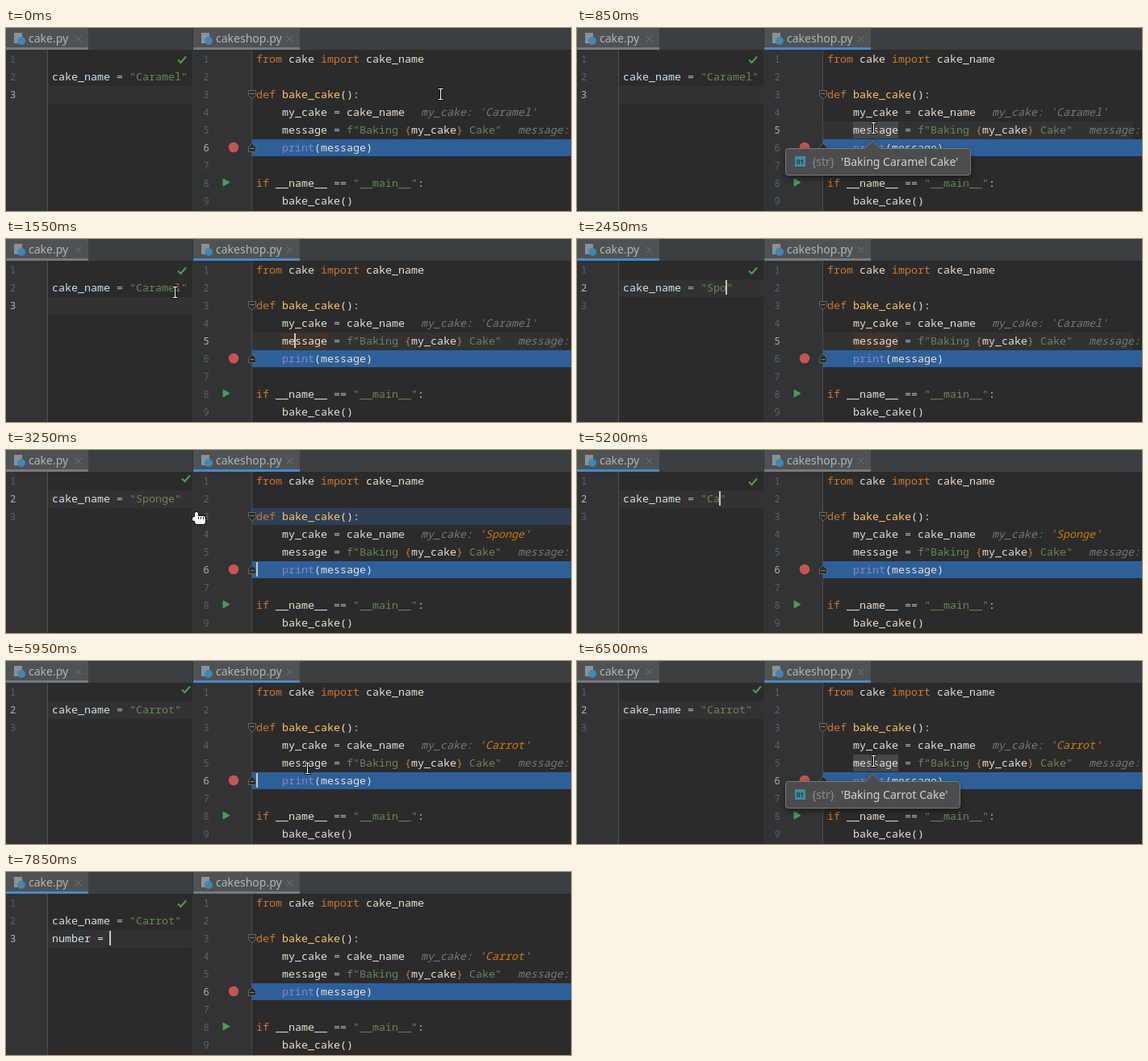
Write an HTML page with a canvas that moves like this. It is 700 px wide and 227 px high and loops after 8 s.

```html
<!DOCTYPE html>
<html lang="en">
<head>
<meta charset="utf-8">
<title>Cake shop debugging</title>
<style>
html, body { margin: 0; width: 700px; height: 227px; overflow: hidden; background: #2b2b2b; }
canvas { display: block; }
</style>
</head>
<body>
<canvas id="stage" width="700" height="227"></canvas>
<script>
const ctx = document.getElementById("stage").getContext("2d");
const LOOP = 8000, STEP = 50, CH = 8;
const MONO = '13.333px "Noto Sans Mono", "DejaVu Sans Mono", monospace';
const NUMS = '12px "Noto Sans Mono", "DejaVu Sans Mono", monospace';
const SANS = '14px "Noto Sans", "Open Sans", sans-serif';
const C = {
  name: "#eee0d2", left: "#cfe3f3", punct: "#b4bec8", key: "#cc7832", fn: "#ffc66d", str: "#6a8759",
  call: "#8888c6", hint: "#787878", changed: "#ca7e03", num: "#5c6268", numOn: "#b4b4b4",
  edit: "#2b2b2b", gutter: "#313335", row: "#323232", exec: "#2d6099", hover: "#2e3f54",
  bar: "#3c3f41", tab: "#4e5254", focus: "#4a88c7", blur: "#747a80", green: "#499c54"
};

// Right-hand code: row, x, then [text, colour] parts
const CODE = [
  [1, 310, ["from ", C.key], ["cake ", C.name], ["import ", C.key], ["cake_name", C.name]],
  [3, 310, ["def ", C.key], ["bake_cake", C.fn], ["():", C.name]],
  [4, 342, ["my_cake", C.name], [" = ", C.punct], ["cake_name", C.name]],
  [5, 342, ["message", C.name], [" = ", C.punct], ['f"Baking ', C.str], ["{", C.key], ["my_cake", C.name], ["}", C.key], [' Cake"', C.str]],
  [6, 342, ["print", C.call], ["(message)", C.name]],
  [8, 310, ["if ", C.key], ["__name__", C.name], [" == ", C.punct], ['"__main__"', C.str], [":", C.name]],
  [9, 342, ["bake_cake()", C.name]]
];

// Pointer moves: start, duration, destination; no destination hides it
const MESSAGE = [367, 124], WORD = [180, 55];
const MOVES = [
  [0, 0, [538, 82]], [0, 600, MESSAGE], [1400, 200, WORD], [2000],
  [3200, 0, [232, 82]], [3200, 450, MESSAGE], [4050, 100, [120, 54]], [4200, 200, WORD], [4500, 200, [105, 153]], [5000],
  [5750, 0, [425, 211]], [5750, 250, MESSAGE], [6500, 450, [92, 114]], [7250]
];

const rowTop = row => 28 + 22 * (row - 1);
const ease = k => k * k * (3 - 2 * k);
const type = (s, t, start, pace) => t < start ? "" : s.slice(0, 1 + Math.floor((t - start) / pace));

// Everything on stage that changes, as a function of time
function stateAt(t) {
  const during = (a, b) => t >= a && t < b;
  const retyped = t >= 5000 ? type("Carrot", t, 5050, 90)
    : type("S", t, 2000, 50) + type("po", t, 2350, 100) + type("nge", t, 2700, 50);
  const leftFocus = during(1700, 3000) || during(4400, 5700) || t >= 6750;
  const leftRow = during(1700, 6750) ? 2 : 3;
  return {
    cake: t < 2000 ? "Caramel" : retyped,
    number: type("number", t, 7250, 55) + type(" = ", t, 7700, 75),
    value: t < 3000 ? "Caramel" : t < 5700 ? "Sponge" : "Carrot",
    valueColor: t < 3000 ? C.hint : C.changed,
    leftFocus, leftRow,
    rightFocus: t >= 650 && !leftFocus,
    rightRow: during(650, 3000) ? 5 : 6,
    selected: during(1800, 2000) || during(4450, 5000),
    checkUp: leftRow === 2 && !during(2000, 2850) && !during(5000, 5500),
    tip: during(800, 1450) || during(3650, 4050) || during(6150, 6550),
    mouse: pointer(t)
  };
}

function pointer(t) {
  let pos = null;
  for (const [start, time, to] of MOVES) {
    if (t < start) break;
    const k = time ? ease(Math.min(1, (t - start) / time)) : 1;
    pos = to && (pos ? to.map((v, i) => pos[i] + (v - pos[i]) * k) : to);
  }
  return pos;
}

function box(x, y, w, h, color) {
  ctx.fillStyle = color;
  ctx.fillRect(x, y, w, h);
}

function text(s, x, y, color, font = MONO) {
  ctx.font = font;
  ctx.fillStyle = color;
  ctx.fillText(s, x, y);
}

function line(points, color, width = 1, fill) {
  ctx.beginPath();
  points.forEach(p => ctx.lineTo(p[0], p[1]));
  if (fill) {
    ctx.closePath();
    ctx.fillStyle = fill;
    ctx.fill();
  }
  ctx.strokeStyle = color;
  ctx.lineWidth = width;
  ctx.stroke();
}

function dot(x, y, r, color) {
  ctx.beginPath();
  ctx.arc(x, y, r, 0, 7);
  ctx.fillStyle = color;
  ctx.fill();
}

function spans(row, x, parts, font = MONO) {
  for (const [s, color] of parts) {
    text(s, x, rowTop(row) + 15, color, font);
    x += s.length * CH;
  }
}

function numbers(x, count, active) {
  for (let n = 1; n <= count; n++) text(n, x, rowTop(n) + 15, n === active ? C.numOn : C.num, NUMS);
}

function caret(x, row) {
  box(x - 1, rowTop(row) + 1, 2, 18, "#c8c8c8");
}

function tab(x, w, name, focused) {
  box(x, 0, w, 24, C.tab);
  box(x, 24, w, 3, focused ? C.focus : C.blur);
  box(x + 10, 6, 10, 13, "#8b9196");
  dot(x + 19, 16, 5, "#3f87b5");
  text(name, x + 28, 18, "#b2b5b7", SANS);
  const cx = x + w - 12.5;
  for (const d of [-3.5, 3.5]) line([[cx - d, 10], [cx + d, 17]], "#737678");
}

function fold(row, dir) {
  const y = rowTop(row) + 10.5;
  const shape = [[-4.5, -5], [4.5, -5], [4.5, 1], [0, 5.5], [-4.5, 1]];
  line(shape.map(p => [305 + p[0], y + p[1] * dir]), "#66696b", 1, C.edit);
  line([[302.5, y - dir], [307.5, y - dir]], "#85888a");
}

function beam(x, y) {
  x = Math.round(x) + 0.5;
  y = Math.round(y);
  for (const [color, w, e] of [["#111111", 3, 1], ["#ffffff", 1, 0]]) {
    line([[x, y - 6.5], [x, y + 6.5]], color, w);
    for (const s of [-6.5, 6.5]) line([[x - 3 - e, y + s], [x + 3 + e, y + s]], color, w);
  }
}

function hand(x, y) {
  ctx.save();
  ctx.translate(Math.round(x), Math.round(y));
  ctx.beginPath();
  ctx.roundRect(-3, -6, 4, 12, 2);
  ctx.roundRect(-6, 0, 6, 5, 2);
  ctx.roundRect(-3, -1, 13, 10, 3);
  ctx.strokeStyle = "#111111";
  ctx.lineWidth = 2;
  ctx.stroke();
  ctx.fillStyle = "#ffffff";
  ctx.fill();
  for (let i = 0; i < 3; i++) box(1 + 3 * i, 0, 1, 3, "#333333");
  ctx.restore();
}

function tooltip(name) {
  const label = `'Baking ${name} Cake'`;
  ctx.font = SANS;
  const x = 258.5, y = 149.5, r = 3, b = y + 33;
  const e = x + 84 + Math.round(ctx.measureText(label).width);
  ctx.beginPath();
  ctx.moveTo(x + r, y);
  ctx.lineTo(357, y);
  ctx.lineTo(366.5, 140);
  ctx.lineTo(376, y);
  ctx.arcTo(e, y, e, b, r);
  ctx.arcTo(e, b, x, b, r);
  ctx.arcTo(x, b, x, y, r);
  ctx.arcTo(x, y, e, y, r);
  ctx.closePath();
  ctx.save();
  ctx.shadowColor = "rgba(0,0,0,.45)";
  ctx.shadowBlur = 8;
  ctx.shadowOffsetY = 3;
  ctx.fillStyle = "#4b4d4d";
  ctx.fill();
  ctx.restore();
  ctx.strokeStyle = "#77797a";
  ctx.lineWidth = 1;
  ctx.stroke();
  box(270, 159, 13, 13, "#3e8ba3");
  text("01", 272, 169, "#1f3b45", 'bold 8px "Noto Sans", sans-serif');
  text("{str}", 291, 171, "#8b8d8e", SANS);
  text(label, 327, 171, "#d0d2d3", SANS);
}

function leftPane(s) {
  const wordEnd = 161 + s.cake.length * CH;
  box(0, 27, 51, 200, C.gutter);
  box(52, rowTop(s.leftRow), 179, 22, C.row);
  box(51, 27, 1, 200, "#4f5152");
  numbers(5, 3, s.leftRow);
  if (s.selected) box(161, rowTop(2), wordEnd - 161, 22, "#214283");
  spans(2, 57, [["cake_name", C.left], [" = ", C.punct], [`"${s.cake}"`, C.str]]);
  spans(3, 57, [[s.number, C.left]]);
  if (s.leftFocus) caret(s.leftRow === 2 ? wordEnd : 57 + s.number.length * CH, s.leftRow);
  const [x, y] = s.checkUp ? [223, 35] : [218, 39];
  line([[x - 5, y + 0.5], [x - 1.5, y + 4], [x + 5, y - 3.5]], C.green, 2.2);
}

function rightPane(s, overRow) {
  box(232, 27, 73, 200, C.gutter);
  if (s.rightRow === 5) box(305, rowTop(5), 383, 22, C.row);
  if (overRow) box(305, rowTop(overRow), 395, 21, C.hover);
  box(305, rowTop(6), 395, 21, C.exec);
  box(304, 27, 1, 200, "#4a4c4d");
  if (s.tip || s.rightRow === 5) box(342, rowTop(5), 56, 21, s.tip ? "#45494a" : "#40332b");
  numbers(244.5, 9, s.rightRow);
  CODE.forEach(([row, x, ...parts]) => spans(row, x, parts));
  spans(4, 514, [["my_cake: ", C.hint], [`'${s.value}'`, s.valueColor]], "italic " + MONO);
  spans(5, 634, [["message: ", C.hint]], "italic " + MONO);
  dot(282, 148, 6.3, "#c75450");
  line([[269, 187], [277, 191.5], [269, 196]], C.green, 1, C.green);
  fold(3, 1);
  fold(6, -1);
  if (s.rightFocus && !s.tip) caret(s.rightRow === 5 ? 358 : 311, s.rightRow);
  if (s.tip) tooltip(s.value);
}

function draw(t) {
  const s = stateAt(t), m = s.mouse;
  const inGutter = m && m[0] > 231 && m[0] < 305;
  box(0, 0, 700, 227, C.edit);
  box(0, 0, 700, 27, C.bar);
  tab(0, 102, "cake.py", s.leftFocus);
  tab(232, 132, "cakeshop.py", s.rightFocus);
  leftPane(s);
  rightPane(s, inGutter && Math.floor((m[1] - 28) / 22) + 1);
  box(231, 0, 1, 227, "#323334");
  if (m) (inGutter ? hand : beam)(...m);
}

const start = performance.now();
function tick(now) {
  const t = Math.max(0, now - start) % LOOP;
  draw(Math.floor(t / STEP) * STEP);
  requestAnimationFrame(tick);
}
draw(0);
requestAnimationFrame(tick);
</script>
</body>
</html>
```
